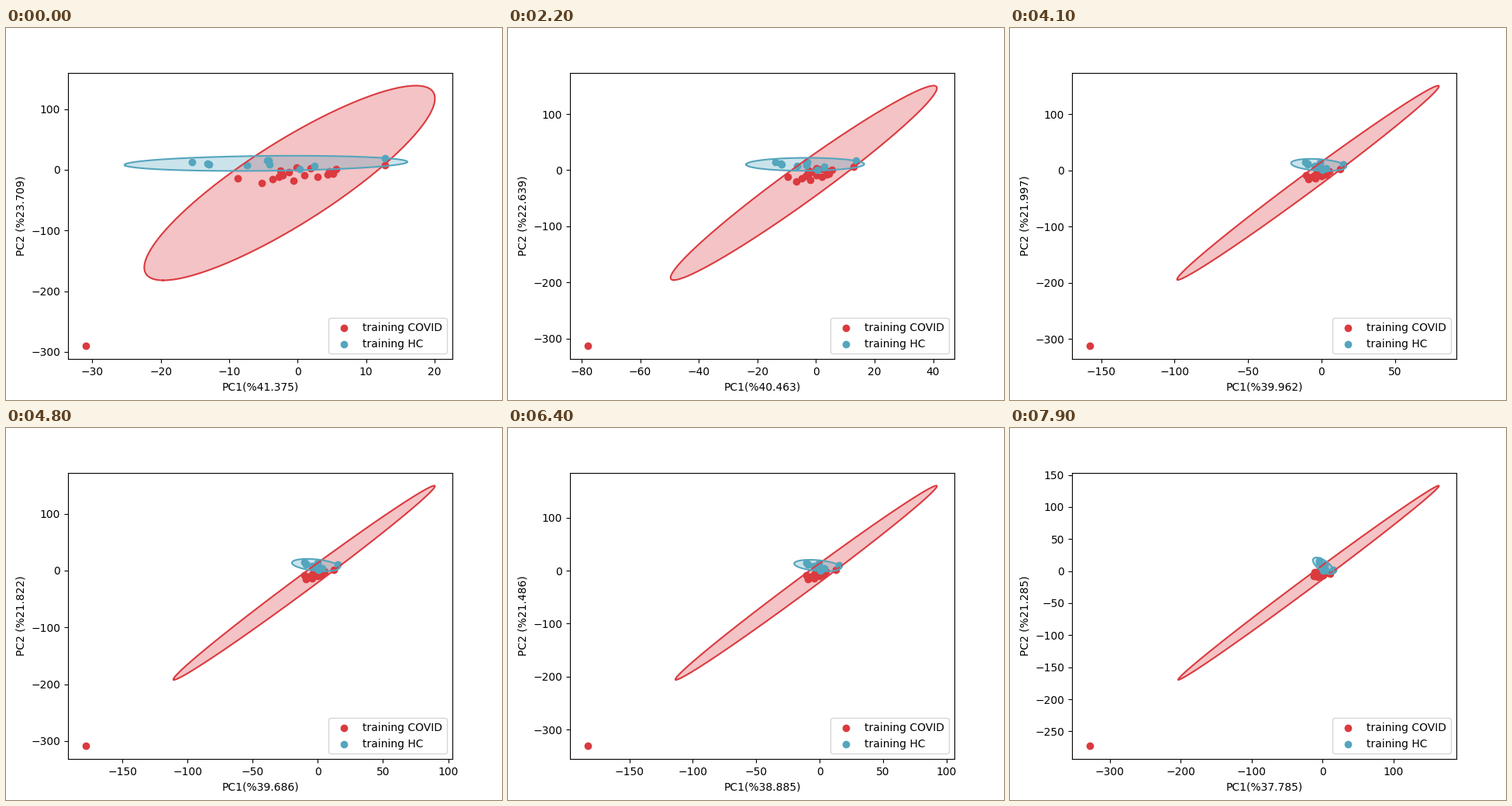
Write a matplotlib script that moves like this. It is 640 by 480 pixels and loops after 8000 ms.

```python
import numpy as np
import matplotlib.pyplot as plt
from matplotlib.animation import FuncAnimation

FRAMES, STEP = 80, 100
RED, BLUE = "#db3a3f", "#54a5bd"
CHI = np.sqrt(5.991)  # 95 % confidence in two dimensions

# Starting scores; all later positions follow from squeeze()
COVID = np.array([
    (-8.8, -14), (-5.3, -22), (-3.7, -15.5), (-2.7, -11.5), (-2.5, -1.3),
    (-2.2, -9), (-2.4, -5), (-1.3, -4), (-0.6, -18), (-0.2, 3.5),
    (1, -9), (1.9, 2.5), (2.9, -12), (4.4, -8), (4.6, -2.5),
    (5.2, -6.5), (5.6, 1), (12.75, 7.5)])
HC = np.array([
    (-15.4, 12.8), (-13.2, 10.2), (-12.9, 9), (-7.4, 7.7), (-4.5, 15.3),
    (-4.2, 14.7), (-4.1, 9), (0.3, 1.3), (2.4, 6.4), (12.75, 19.2)])

# Key poses: frame, outlier x, outlier y, PC1 %, PC2 %
KEYS = np.array([
    (0, -31, -290.5, 41.375, 23.709),
    (11, -41.5, -303, 41.023, 23.262),
    (22, -78, -313.5, 40.463, 22.639),
    (41, -158, -312.5, 39.962, 21.997),
    (55, -198.5, -305.5, 39.409, 21.647),
    (64, -183, -331, 38.885, 21.486),
    (79, -328.5, -273, 37.785, 21.285)]).T


def pose(i):
    return [np.interp(i, KEYS[0], row) for row in KEYS[1:]]


def angle(x, y):
    return np.arctan2(-x, -y)


START = angle(*KEYS[1:3, 0])


def squeeze(points, turn):
    """Turn the cloud along with the outlier while it shrinks."""
    s, c = np.sin(turn), np.cos(turn)
    mat = np.array([[c * (1 - 0.18 * s), 0.55 * s],
                    [-0.87 * s, c * (1 - 0.4 * s)]])
    return points @ mat.T


def ellipse(points):
    val, vec = np.linalg.eigh(np.cov(points.T))
    minor, major = vec.T
    major = -np.sign(major[1]) * major
    t = np.linspace(0, 2 * np.pi, 200)[:, None]
    ring = np.sqrt(val[1]) * np.cos(t) * major + np.sqrt(val[0]) * np.sin(t) * minor
    return (points.mean(axis=0) + CHI * ring).T


fig, ax = plt.subplots(figsize=(6.4, 4.8), dpi=100)


def draw(i):
    ax.clear()
    x, y, pc1, pc2 = pose(i)
    turn = angle(x, y) - START
    covid = np.vstack([squeeze(COVID, turn), (x, y)])
    groups = [(covid, RED, "training COVID"),
              (squeeze(HC, turn), BLUE, "training HC")]
    for points, color, _ in groups:
        edge = ellipse(points)
        ax.fill(*edge, color=color, alpha=0.3, lw=0)
        ax.plot(*edge, color=color, lw=1.5)
    for points, color, label in groups:
        ax.scatter(*points.T, color=color, label=label)
    ax.set_xlabel(f"PC1(%{pc1:.3f})")
    ax.set_ylabel(f"PC2 (%{pc2:.3f})")
    ax.legend(loc="lower right")
    return ax.get_children()


anim = FuncAnimation(fig, draw, frames=FRAMES, interval=STEP,
                     init_func=lambda: draw(0), repeat=True, repeat_delay=0)
plt.show()
```
